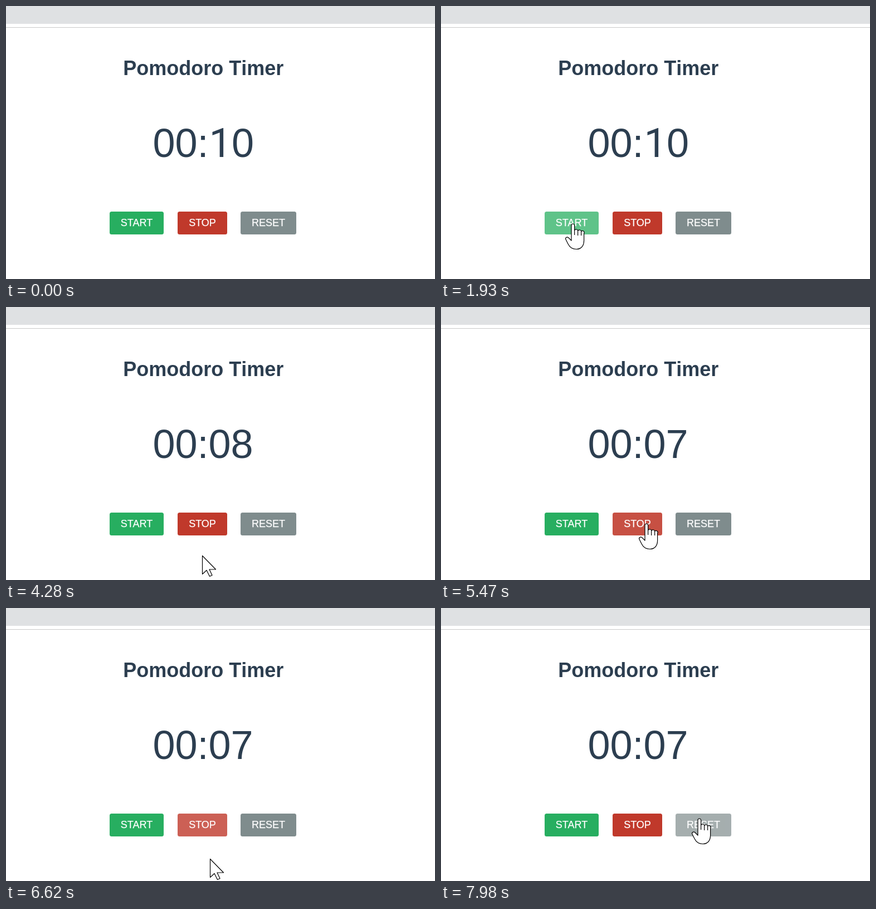
Animation, 770 px wide and 490 px high, one loop 8000 ms. Source, as an HTML page:

```html
<!DOCTYPE html>
<html lang="en">
<head>
<meta charset="utf-8">
<title>Pomodoro Timer</title>
<style>
  html, body { margin: 0; width: 100%; height: 100%; overflow: hidden; background: #fff; }
  svg { display: block; font-family: "Liberation Sans", Arial, sans-serif; }
  .dark { fill: #2c3e50; font-kerning: none; }
  .one { font-family: Roboto, sans-serif; } /* a "1" without a foot */
  .buttons text { fill: #fff; stroke: #fff; stroke-width: .25; font-size: 18px; text-anchor: middle; }
  #pointer path { fill: #fff; stroke: #000; stroke-width: 1.2; stroke-linejoin: round; }
</style>
</head>
<body>
<svg width="770" height="490" viewBox="0 0 770 490">
  <rect width="770" height="32" fill="#dfe1e3"/>
  <rect y="38" width="770" height="1" fill="#c9c9c9"/>
  <text class="dark" x="210.2" y="124" font-size="36" font-weight="bold">Pomodoro Timer</text>
  <text class="dark" id="clock" x="263.4" y="271" font-size="72"></text>
  <g class="buttons">
    <g><rect x="186" y="369" width="97" height="41" rx="3.5" fill="#27ae60"/><text x="234.5" y="395">START</text></g>
    <g><rect x="308" y="369" width="89" height="41" rx="3.5" fill="#c0392b"/><text x="352.5" y="395">STOP</text></g>
    <g><rect x="421" y="369" width="100" height="41" rx="3.5" fill="#7f8c8d"/><text x="471" y="395">RESET</text></g>
  </g>
  <g id="pointer">
    <circle id="click" r="24" fill="#ff0" fill-opacity=".47"/>
    <path id="arrow" d="M.5 .5V33.5L8 26.5 13.5 37.5 18 35.5 13 25H24.5Z"/>
    <path id="hand" d="M-3 3a2.8 3 0 0 1 5.6 0v9a3 2.5 0 0 1 6 1a3 2.5 0 0 1 6 1a2.5 2.5 0 0 1 5 3V30C19.6 40 14 45.5 6 45.5C-1 45.5-6 42-9 36L-13 28C-14.5 25-11 22.5-8 25L-3 30ZM2.6 12v8M8.6 13v8M14.6 14v7"/>
  </g>
</svg>
<script>
const LOOP = 8000, FADE = 200, ENTRY = { x: 536, y: 478 };
const $ = id => document.getElementById(id);
const buttons = document.querySelectorAll('.buttons > g');

const moves = [
  { start: 1330, end: 1990, x: 236, y: 391 },
  { start: 2410, end: 2690, x: 352, y: 446 },
  { start: 5270, end: 5545, x: 370, y: 384 },
  { start: 6420, end: 6690, x: 366, y: 455 },
  { start: 7360, end: 7950, x: 464, y: 378 }
];
const hovers = [[1802, 2550], [5427, 6585], [7800, LOOP]]; // one per button
const clicks = [[2210, 2290], [6010, 6140]];
const RUN = 2300, STOP = 6010, TICK = 990;

const clamp = p => Math.min(1, Math.max(0, p));
const within = (t, [from, to]) => t >= from && t < to;
const easeOut = p => 1 - (1 - clamp(p)) ** 2;
const easeInOut = p => p < 0.5 ? 4 * p ** 3 : 1 - 4 * (1 - p) ** 3;
const show = (el, on) => el.setAttribute('visibility', on ? 'visible' : 'hidden');

function position(t) {
  let { x, y } = ENTRY;
  for (const m of moves) {
    const p = easeInOut(clamp((t - m.start) / (m.end - m.start)));
    x += (m.x - x) * p;
    y += (m.y - y) * p;
  }
  return [Math.round(x), Math.round(y)];
}

function draw(t) {
  const left = 10 - Math.floor(Math.max(0, Math.min(t, STOP) - RUN) / TICK);
  $('clock').innerHTML = ('00:' + String(left).padStart(2, '0'))
    .replace('1', '<tspan class="one" dx="1">1</tspan>');

  hovers.forEach(([enter, leave], i) => {
    const amount = easeOut((t - enter) / FADE) - easeOut((t - leave) / FADE);
    buttons[i].setAttribute('opacity', 1 - 0.3 * amount);
  });

  const visible = t >= moves[0].start;
  const over = hovers.some(h => within(t, h));
  show($('arrow'), visible && !over);
  show($('hand'), visible && over);
  show($('click'), clicks.some(c => within(t, c)));
  $('pointer').setAttribute('transform', `translate(${position(t)})`);
}

const start = performance.now();
function frame() {
  draw((performance.now() - start) % LOOP);
  requestAnimationFrame(frame);
}
frame();
</script>
</body>
</html>
```
